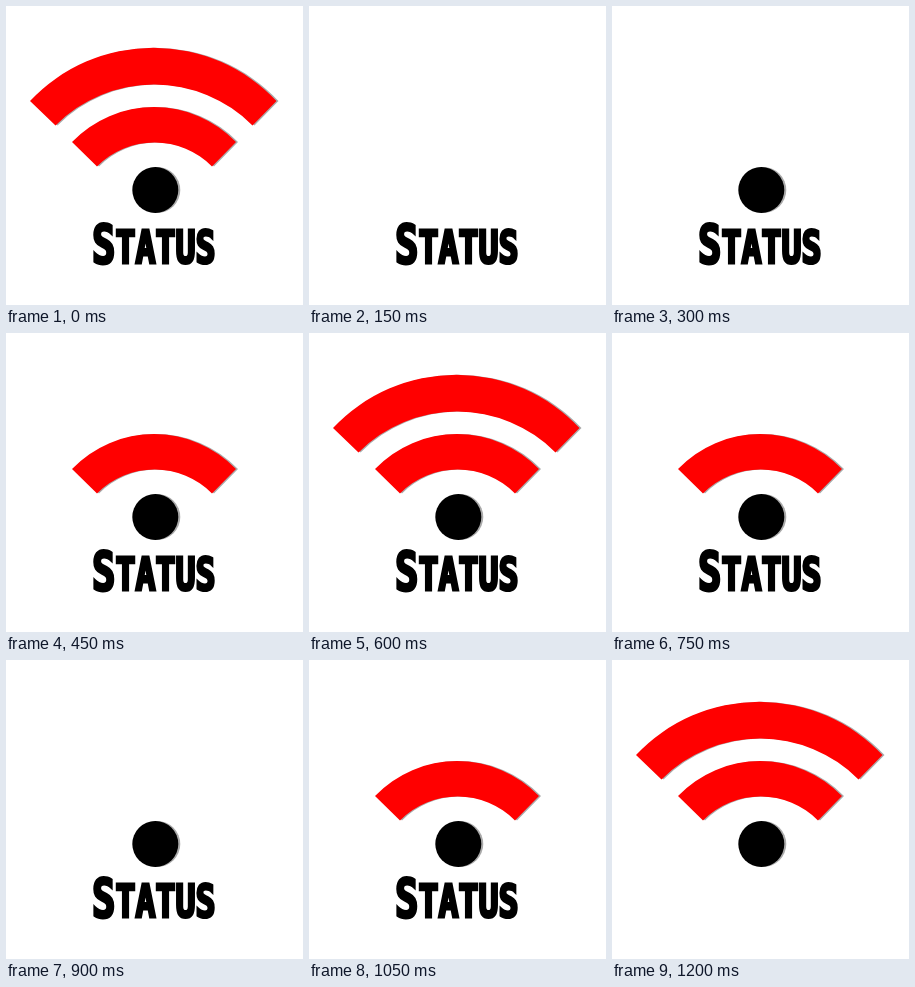
Recreate the animation shown at these times as an HTML page. Size 297 px wide and 299 px high, loop 1.35 s.

```html
<!DOCTYPE html>
<html lang="en">
<head>
<meta charset="utf-8">
<title>Status</title>
<style>
  html, body { margin: 0; width: 100%; height: 100%; overflow: hidden; background: #fff; }
  svg { display: block; width: 100%; height: 100%; }
  .mark { filter: drop-shadow(2.3px .4px .5px #aaa); }
  .wave { fill: #f00; }
  /* heavy condensed small capitals */
  text {
    font: bold 45px "DejaVu Sans Mono", monospace;
    stroke: #000; stroke-width: 3.2px;
    transform: translate(86px, 257.4px) scaleX(.74);
  }
  .initial { font-size: 52.6px; }
</style>
</head>
<body>
<svg viewBox="0 0 297 299">
  <path id="outer" class="mark wave" d="M24 95A169.2 169.2 0 0 1 270.5 95L246.5 119.5A138.8 138.8 0 0 0 49.5 119.5Z"/>
  <path id="inner" class="mark wave" d="M66 136A113.6 113.6 0 0 1 230 136L206 160.5A80.9 80.9 0 0 0 91 160.5Z"/>
  <circle id="dot" class="mark" cx="149.3" cy="184" r="23"/>
  <text id="label"><tspan class="initial">S</tspan>TATUS</text>
</svg>
<script>
  const STEP = 150;
  // Signal strength per step: 0 none, 1 dot, 2 inner wave, 3 outer wave
  const levels = [3, 0, 1, 2, 3, 2, 1, 2, 3];
  const parts = ["dot", "inner", "outer"].map(id => document.getElementById(id));
  const label = document.getElementById("label");

  const show = (el, on) => { el.style.visibility = on ? "visible" : "hidden"; };

  function draw() {
    const step = Math.floor(performance.now() / STEP) % levels.length;
    parts.forEach((el, i) => show(el, i < levels[step]));
    show(label, step < levels.length - 1);
    requestAnimationFrame(draw);
  }
  draw();
</script>
</body>
</html>
```
